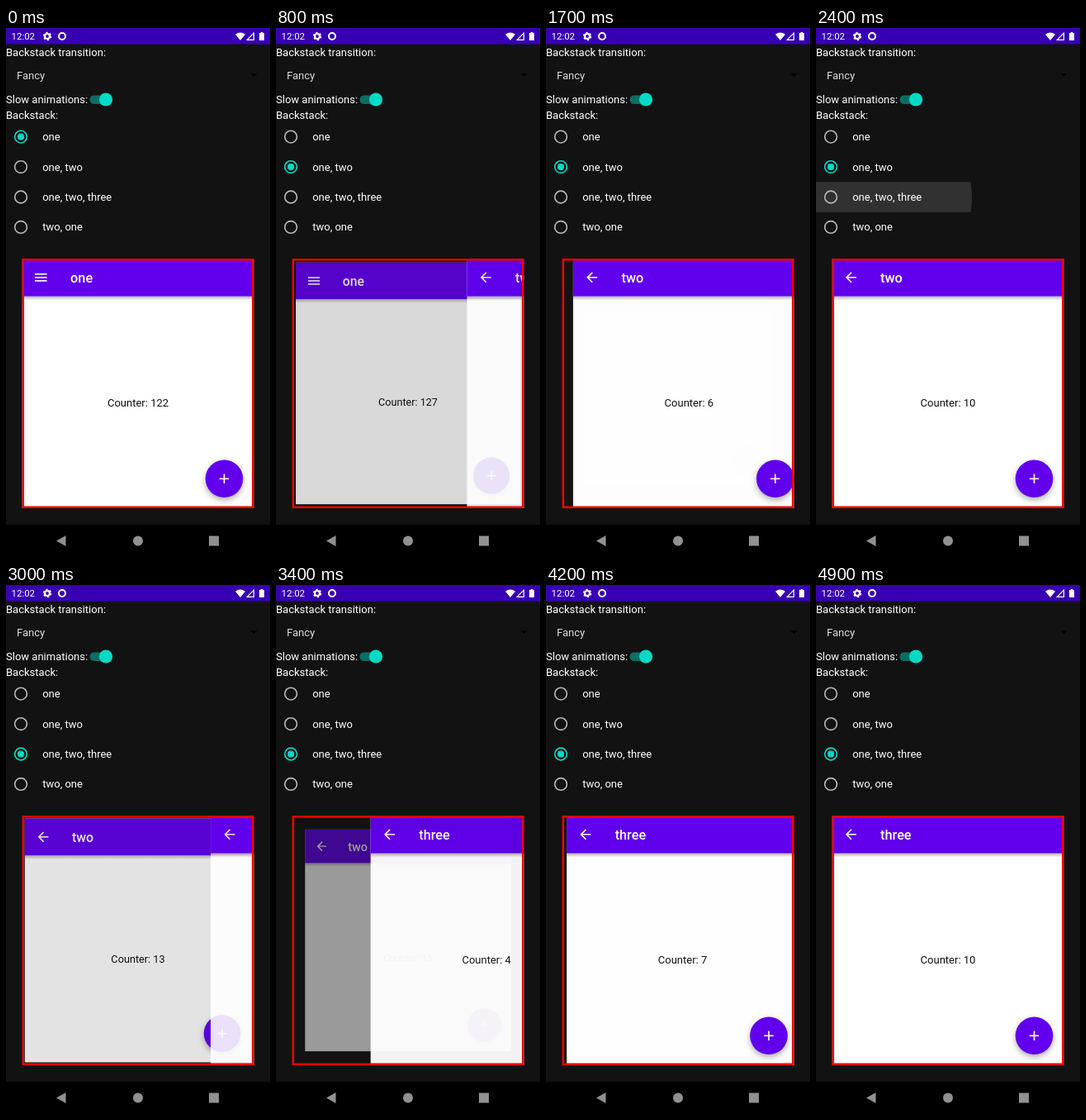
Write an HTML page with a canvas that moves like this. It is 320x640 px and loops after 5000 ms.

```html
<!DOCTYPE html>
<html lang="en">
<head>
<meta charset="utf-8">
<title>Backstack transition</title>
<style>
  html, body { margin: 0; width: 100%; height: 100%; overflow: hidden; background: #121212; }
  canvas { display: block; width: 320px; height: 640px; }
</style>
</head>
<body>
<canvas id="stage" width="320" height="640"></canvas>
<script>
const W = 320, H = 640, LOOP = 5000, DP = 0.8145;
const BG = '#121212', TEAL = '#03dac5', VIOLET = '#6200ee', WHITE = '#fff';
const BOX = { x: 19.5, y: 279, w: 281, h: 302 };
const CX = 160, CY = 430, BAR = 45.6;
const ROWS = ['one', 'one, two', 'one, two, three', 'two, one'];
const rowY = i => 131.6 + 36.45 * i;

// Each page counts up at its own pace.
const PAGES = [
  { title: 'one', from: 122, start: -185, step: 190 },
  { title: 'two', from: 0, start: 325, step: 205 },
  { title: 'three', from: 0, start: 2450, step: 235 }
];
const MOVES = [
  { start: 325, length: 1880 },
  { start: 2541, length: 2026 }
];
const RIPPLE_LEAD = 240;

const ARROW = new Path2D('M20 11H7.83l5.59-5.59L12 4l-8 8 8 8 1.41-1.41L7.83 13H20z');

const ctx = document.getElementById('stage').getContext('2d');
const layer = document.createElement('canvas');
layer.width = W;
layer.height = H;
const layerCtx = layer.getContext('2d');

const clamp = v => Math.max(0, Math.min(1, v));

// cubic-bezier(.4, 0, .2, 1)
function ease(x) {
  if (x <= 0 || x >= 1) return clamp(x);
  let lo = 0, hi = 1;
  for (let i = 0; i < 24; i++) {
    const s = (lo + hi) / 2, r = 1 - s;
    if (1.2 * s * r * r + 0.6 * s * s * r + s * s * s < x) lo = s;
    else hi = s;
  }
  return lo * lo * (3 - 2 * lo);
}

function rect(c, x, y, w, h, color) {
  c.fillStyle = color;
  c.fillRect(x, y, w, h);
}

function disc(c, x, y, r, color) {
  c.fillStyle = color;
  c.beginPath();
  c.arc(x, y, r, 0, Math.PI * 2);
  c.fill();
}

function ring(c, x, y, r, width, color) {
  c.strokeStyle = color;
  c.lineWidth = width;
  c.beginPath();
  c.arc(x, y, r, 0, Math.PI * 2);
  c.stroke();
}

function poly(c, points, color) {
  c.fillStyle = color;
  c.beginPath();
  points.forEach(([x, y]) => c.lineTo(x, y));
  c.closePath();
  c.fill();
}

function text(c, str, x, y, color = WHITE, size = 13.03, weight = 400, align = 'left') {
  c.font = `${weight} ${size}px Roboto, sans-serif`;
  c.textAlign = align;
  c.fillStyle = color;
  c.fillText(str, x, y);
}

function drawStatusBar() {
  rect(ctx, 0, 0, W, 19.6, '#3700b3');
  text(ctx, '12:02', 6.6, 14, WHITE, 11.4);

  ring(ctx, 50, 10, 3, 2.2, WHITE);
  ctx.setLineDash([2.4, 2.4]);
  ring(ctx, 50, 10, 4.55, 1.3, WHITE);
  ctx.setLineDash([]);
  ring(ctx, 68, 10, 4, 2, WHITE);

  ctx.fillStyle = WHITE;
  ctx.beginPath();
  ctx.moveTo(284, 15);
  ctx.lineTo(278, 7.8);
  ctx.quadraticCurveTo(284, 3, 290, 7.8);
  ctx.fill();

  ctx.strokeStyle = WHITE;
  ctx.lineWidth = 1.2;
  ctx.beginPath();
  ctx.moveTo(292.3, 14.3);
  ctx.lineTo(300.4, 14.3);
  ctx.lineTo(300.4, 6.2);
  ctx.closePath();
  ctx.stroke();

  rect(ctx, 307, 6, 6, 9, WHITE);
  rect(ctx, 308.7, 5, 2.6, 1, WHITE);
}

function drawNavBar() {
  const gray = '#919191';
  rect(ctx, 0, 601, W, 39, '#000');
  poly(ctx, [[61, 620.5], [72.5, 614], [72.5, 627]], gray);
  disc(ctx, 160, 620.5, 6, gray);
  rect(ctx, 246, 614.5, 12, 12, gray);
}

function drawRipple(t) {
  MOVES.forEach((move, i) => {
    const age = t - move.start + RIPPLE_LEAD;
    if (age < 0 || age > 540) return;
    const k = clamp(age / 330), y = rowY(i + 1);
    ctx.save();
    ctx.beginPath();
    ctx.rect(0, y - 18.2, W, 36.4);
    ctx.clip();
    ctx.globalAlpha = 0.13 * (1 - clamp((age - 260) / 280));
    disc(ctx, 60 + 100 * k, y, 70 + 95 * k, WHITE);
    ctx.restore();
  });
}

function drawSettings(t, selected) {
  text(ctx, 'Backstack transition:', 0, 33.5);
  text(ctx, 'Fancy', 13, 62, '#dcdcdc');
  poly(ctx, [[296.3, 55], [304.5, 55], [300.4, 59.2]], '#000');
  text(ctx, 'Slow animations:', 0, 91.3);

  ctx.fillStyle = '#0a6e65';
  ctx.beginPath();
  ctx.roundRect(101.5, 81.5, 27, 10.5, 5);
  ctx.fill();
  disc(ctx, 121, 86.5, 8.1, TEAL);

  text(ctx, 'Backstack:', 0, 109.7);
  drawRipple(t);
  ROWS.forEach((label, i) => {
    const y = rowY(i), on = i === selected;
    ring(ctx, 18, y, 7.35, 1.63, on ? TEAL : '#b8b8b8');
    if (on) disc(ctx, 18, y, 4.1, TEAL);
    text(ctx, label, 44.2, y + 4.5);
  });
}

function drawPage(c, index, t) {
  const { title, from, start, step } = PAGES[index];
  const count = from + Math.max(0, Math.floor((t - start) / step));
  const { x, y, w, h } = BOX;
  const bottom = y + BAR, mid = y + BAR / 2;

  rect(c, x, y, w, h, WHITE);
  const shade = c.createLinearGradient(0, bottom, 0, bottom + 5);
  shade.addColorStop(0, 'rgba(0,0,0,.28)');
  shade.addColorStop(1, 'rgba(0,0,0,0)');
  rect(c, x, bottom, w, 5, shade);
  rect(c, x, y, w, BAR, VIOLET);

  if (index === 0) {
    for (let i = -1; i < 2; i++) rect(c, 34.9, mid + i * 4.07 - 0.8, 14.7, 1.63, WHITE);
  } else {
    c.save();
    c.translate(42.3 - 12 * DP, mid - 12 * DP);
    c.scale(DP, DP);
    c.fillStyle = WHITE;
    c.fill(ARROW);
    c.restore();
  }
  text(c, title, 78.1, 307.9, WHITE, 16.29, 500);
  text(c, 'Counter: ' + count, CX, 458, '#111', 13.03, 400, 'center');

  c.save();
  c.shadowColor = 'rgba(0,0,0,.32)';
  c.shadowBlur = 7;
  c.shadowOffsetY = 3;
  disc(c, 264.5, 545.3, 22.8, VIOLET);
  c.restore();
  rect(c, 258.8, 544.5, 11.4, 1.63, WHITE);
  rect(c, 263.7, 539.6, 1.63, 11.4, WHITE);
}

function drawBackPage(index, t, p) {
  const scale = 1 - p * (0.109 + 0.091 * p);
  ctx.save();
  ctx.translate(CX, CY);
  ctx.scale(scale, scale);
  ctx.translate(-CX, -CY);
  drawPage(ctx, index, t);
  ctx.globalAlpha = 0.64 * p;
  rect(ctx, BOX.x - 1, BOX.y - 1, BOX.w + 2, BOX.h + 2, BG);
  ctx.restore();
}

function drawFrontPage(index, t, p) {
  layerCtx.clearRect(0, 0, W, H);
  layerCtx.save();
  layerCtx.translate((1 - p) * 280.5, 0);
  drawPage(layerCtx, index, t);
  layerCtx.restore();
  ctx.globalAlpha = 0.85 + 0.15 * p;
  ctx.drawImage(layer, 0, 0);
  ctx.globalAlpha = 1;
}

function drawPages(t, current) {
  const { x, y, w, h } = BOX;
  ctx.save();
  ctx.beginPath();
  ctx.rect(x, y, w, h);
  ctx.clip();
  const move = MOVES[current - 1];
  const p = move ? ease((t - move.start) / move.length) : 1;
  if (p < 1) {
    drawBackPage(current - 1, t, p);
    drawFrontPage(current, t, p);
  } else {
    drawPage(ctx, current, t);
  }
  ctx.restore();
  ctx.strokeStyle = '#f00000';
  ctx.lineWidth = 2.5;
  ctx.strokeRect(x + 1.25, y + 1.25, w - 2.5, h - 2.5);
}

function frame(now) {
  const t = now % LOOP;
  const current = MOVES.filter(m => t >= m.start).length;
  rect(ctx, 0, 0, W, H, BG);
  drawStatusBar();
  drawSettings(t, current);
  drawPages(t, current);
  drawNavBar();
}

const begin = performance.now();
function tick() {
  frame(performance.now() - begin);
  requestAnimationFrame(tick);
}
tick();
</script>
</body>
</html>
```
